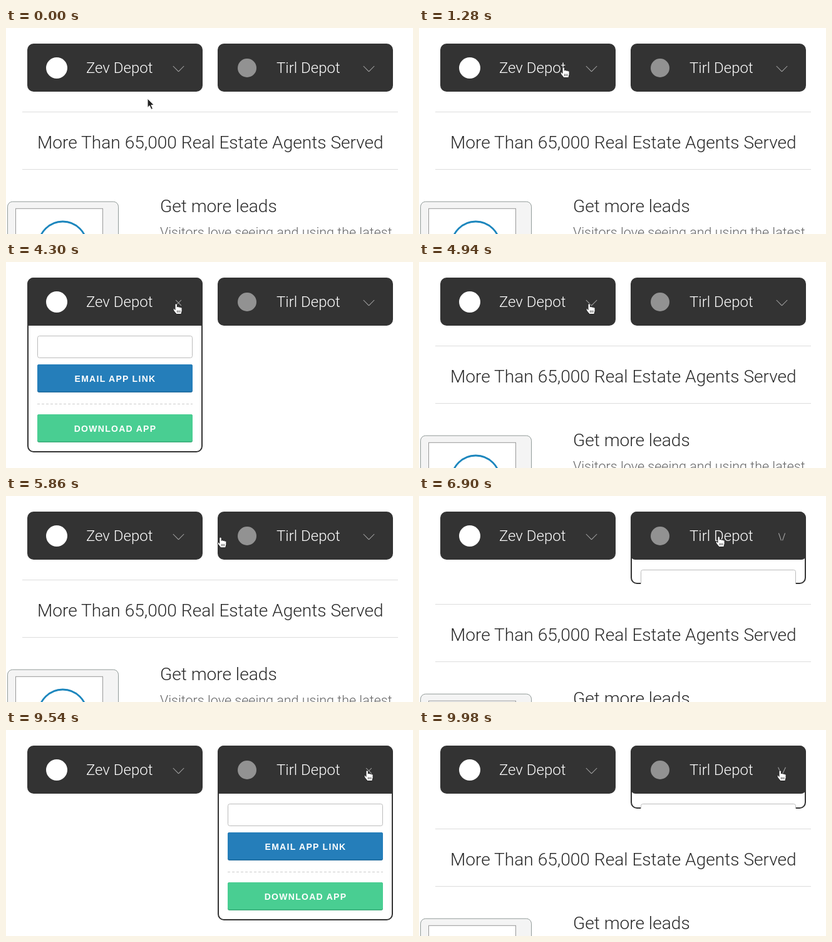
An HTML page that plays this animation: 650x330 px, repeating every 10000 ms.

```html
<!DOCTYPE html>
<html lang="en">
<head>
<meta charset="utf-8">
<title>Store buttons</title>
<style>
  html, body { margin: 0; width: 100%; height: 100%; overflow: hidden; background: #fff; }
  svg { display: block; }
  text { font-family: Roboto, sans-serif; font-weight: 300; fill: #282828; }
  .label { font-size: 24px; fill: #fff; }
  .title { font-size: 28.1px; }
  .copy { font-size: 21.5px; fill: #666; }
  .button { font: bold 14px "Liberation Sans", Arial, sans-serif; letter-spacing: 1.3px; fill: #fff; text-anchor: middle; }
  .bar { stroke: #aaa; }
  .rule { stroke: #ddd; }
</style>
</head>
<body>
<svg width="650" height="330" viewBox="0 0 650 330">
  <g id="page">
    <path class="rule" d="M26 134.5H626M26 226.5H626"/>
    <text class="title" x="50" y="193">More Than 65,000 Real Estate Agents Served</text>
    <text class="title" x="246" y="295">Get more leads</text>
    <text class="copy" x="246" y="334.5">Visitors love seeing and using the latest</text>
    <rect x="2.5" y="278.2" width="177" height="240" rx="8" fill="#f4f4f4" stroke="#919a98"/>
    <rect x="15.5" y="289.3" width="139" height="190" fill="#fff" stroke="#999"/>
    <circle cx="90.6" cy="348.5" r="38.5" fill="none" stroke="#1c86bd" stroke-width="2.8"/>
  </g>
  <g id="cards"></g>
  <path id="arrow" d="M0 0V14.5L3.3 11.4 5.9 17.4 8.5 16.3 5.9 10.5H10.3Z" fill="#222" stroke="#fff"/>
  <g id="hand" stroke="#222" stroke-linejoin="round">
    <path fill="#fff" d="M-2 1.5a1.7 1.7 0 0 1 3.4 0V5.2a1.5 1.5 0 0 1 2.8 .3a1.5 1.5 0 0 1 2.6 .6a1.4 1.4 0 0 1 2.3 1.2V11.5L7.8 16.5H.2L-4.2 11Q-5.8 8.2 -4 7.7T-2 9.5Z"/>
    <path stroke-width=".8" d="M1.5 10.5v3.5M3.7 10.5v3.5M5.9 10.5v3.5"/>
  </g>
</svg>
<script>
const LOOP = 10000, SLIDE = 400, PANEL = 203, RADIUS = 10;
const $ = id => document.getElementById(id);

const cards = [
  { x: 34, name: 'Zev Depot', logo: '#fff', size: 17, open: 1350, close: 4520 },
  { x: 338, name: 'Tirl Depot', logo: '#929292', size: 15, open: 6785, close: 9671 }
];

// Cursor stops: time, x, y
const stops = [
  [0, 226, 113], [300, 226, 113], [1100, 231, 63], [3200, 231, 63], [3900, 272, 67],
  [5350, 272, 67], [6650, 479, 65], [8600, 479, 65], [9300, 577, 65], [LOOP, 577, 65]
];

const button = (y, fill, edge, text) => `
  <rect x="16" y="${y}" width="248" height="45" rx="3" fill="${edge}"/>
  <rect x="16" y="${y}" width="248" height="43.5" rx="3" fill="${fill}"/>
  <text class="button" x="140.5" y="${y + 28}">${text}</text>`;

$('cards').innerHTML = cards.map((c, i) => `
  <g transform="translate(${c.x})">
    <clipPath id="clip${i}"><rect width="280" y="102" height="0"/></clipPath>
    <rect class="panel" x="1" y="26" width="278" rx="${RADIUS - 1}" fill="#fff" stroke="#333" stroke-width="2"/>
    <g clip-path="url(#clip${i})">
      <rect x="16.5" y="118.5" width="247" height="35" rx="3" fill="#fff" stroke="#bbb"/>
      ${button(164, '#257eba', '#1f6a9d', 'EMAIL APP LINK')}
      <path d="M16 227.5H264" stroke="#ccc" stroke-dasharray="4 3"/>
      ${button(244, '#49ce92', '#3bab78', 'DOWNLOAD APP')}
    </g>
    <path class="header" fill="#333"/>
    <circle cx="47" cy="64" r="${c.size}" fill="${c.logo}"/>
    <text class="label" x="94" y="72">${c.name}</text>
    <path class="bar" d="M0 -6.2V6.2"/>
    <path class="bar" d="M0 -6.2V6.2"/>
  </g>`).join('');

cards.forEach((c, i) => {
  const group = $('cards').children[i];
  c.panel = group.querySelector('.panel');
  c.header = group.querySelector('.header');
  c.bars = group.querySelectorAll('.bar');
  c.clip = group.querySelector('clipPath rect');
});

const clamp = v => Math.min(1, Math.max(0, v));
const smooth = v => v * v * (3 - 2 * v);
const swing = v => (1 - Math.cos(Math.PI * v)) / 2;

function headerPath(r) {
  const R = RADIUS;
  return `M0 ${25 + R}a${R} ${R} 0 0 1 ${R} ${-R}H${280 - R}a${R} ${R} 0 0 1 ${R} ${R}` +
    `V${102 - r}a${r} ${r} 0 0 1 ${-r} ${r}H${r}a${r} ${r} 0 0 1 ${-r} ${-r}Z`;
}

function drawCard(c, t) {
  const q = clamp((t - c.open) / SLIDE) - clamp((t - c.close) / SLIDE);
  const height = Math.round(PANEL * swing(q));
  c.panel.setAttribute('height', 75 + height);
  c.panel.style.display = height ? '' : 'none';
  c.clip.setAttribute('height', height);
  c.header.setAttribute('d', headerPath(RADIUS * (1 - q)));
  // Chevron halves turn and slide together into a cross
  c.bars.forEach((bar, i) => {
    const side = i ? 1 : -1;
    bar.setAttribute('transform',
      `translate(${241.5 + side * 4.3 * (1 - q)} 65.4) rotate(${side * (45 - 90 * q)})`);
  });
  return height;
}

function drawCursor(t) {
  const i = stops.findIndex(s => s[0] > t);
  const [t0, x0, y0] = stops[i - 1], [t1, x1, y1] = stops[i];
  const k = smooth((t - t0) / (t1 - t0));
  const x = x0 + (x1 - x0) * k, y = y0 + (y1 - y0) * k;
  const over = y < 102 && cards.some(c => x >= c.x && x <= c.x + 280);
  for (const id of ['arrow', 'hand']) {
    $(id).setAttribute('transform', `translate(${x} ${y})`);
    $(id).style.display = (id === 'hand') === over ? '' : 'none';
  }
}

function draw(t) {
  const shift = Math.max(...cards.map(c => drawCard(c, t)));
  $('page').setAttribute('transform', `translate(0 ${shift})`);
  drawCursor(t);
}

const start = performance.now();
function tick() {
  draw((performance.now() - start) % LOOP);
  requestAnimationFrame(tick);
}
tick();
</script>
</body>
</html>
```
